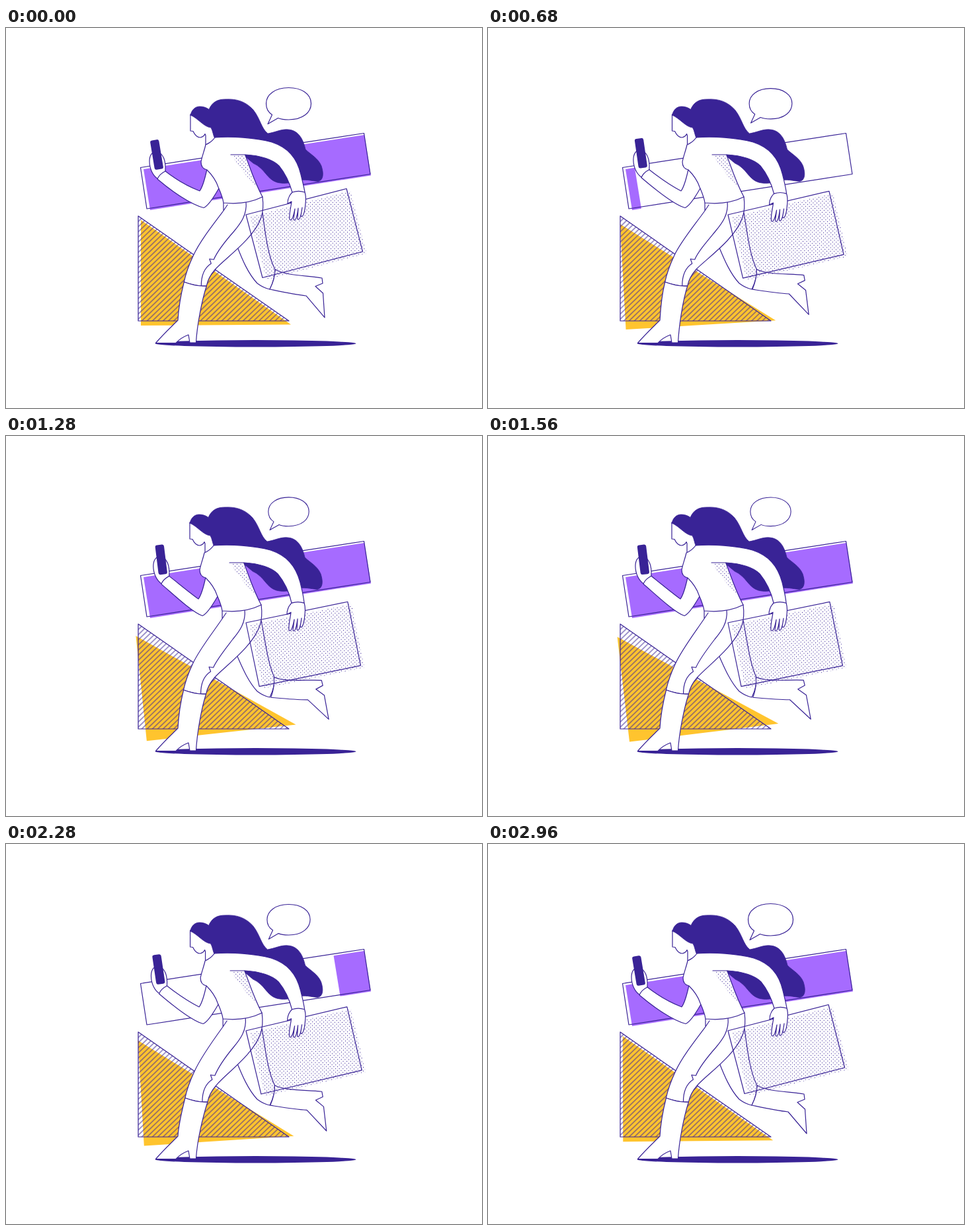
An HTML page that plays this animation: 720 px wide and 576 px high, repeating every 3000 ms.

```html
<!DOCTYPE html>
<html lang="en">
<head>
<meta charset="utf-8">
<title>Runner with phone</title>
<style>
  html, body { margin: 0; width: 100%; height: 100%; overflow: hidden; background: #fff; }
  svg { display: block; width: 720px; height: 576px; }
</style>
</head>
<body>
<svg viewBox="0 0 720 576" fill="#fff" stroke="#392396" stroke-width="1.2" stroke-linejoin="round" stroke-linecap="round">
  <defs>
    <pattern id="dots" width="5.6" height="5.6" patternUnits="userSpaceOnUse">
      <g fill="#392396" stroke="none"><circle cx="1.4" cy="1.4" r=".65"/><circle cx="4.2" cy="4.2" r=".65"/></g>
    </pattern>
    <pattern id="hatch" width="5.6" height="5.6" patternUnits="userSpaceOnUse" patternTransform="rotate(-44)">
      <path d="M0 2.8H5.6" stroke-width="1"/>
    </pattern>
  </defs>

  <polygon id="band" fill="#a66bff" stroke="none"/>
  <path d="M203.5 211.5L541.5 159.5L551 221.5L213 274Z" fill="none"/>

  <path id="wedge" d="M204 291V451L431 449.5Z" fill="#ffc42e" stroke="none"/>
  <path d="M200 285V444H428Z" fill="url(#hatch)"/>

  <ellipse cx="377.5" cy="478.3" rx="152" ry="5.2" fill="#392396" stroke="none"/>

  <path id="backThigh"/>
  <path id="shank" d="M407 366C425 376 455 375 478 379L479 387L468 391.5L479.5 402L482 439L454 406C436 404 418 400 399 396C403 388 407 378 407 366Z"/>
  <path id="frontLeg"/>
  <path id="fold" fill="none"/>
  <path id="boot"/>

  <g id="head">
    <path d="M279 131V156L283 156.500C286 163 290 166 294 166C298 165 300 163 301 160.500L302 163V177L318 168L312 140Z"/>
    <path fill="#392396" stroke-width=".8" d="M279 132C281 124 286 119 293 119C299 119 304 121 307 123.500C312 112 320 108 332 108C350 107 363 112 374 124C385 138 386 152 396 160C408 158 416 153 427 154C441 155 449 166 453 184C461 192 472 197 477 209C481 221 480 231 472 232.500C462 232 452 228 440 232C428 236 418 236 410 234C394 229 392 213 374 205L350 185L316 168C313 162 313 156 310 151C299 150 291 137 279 132Z"/>
  </g>

  <g id="hand">
    <path d="M230 229C222 224 217 213 217 202C217 193 221 187 228 187C237 190 242 200 241 217Z"/>
    <rect id="phone" x="221.300" y="169.500" width="13.400" height="45" rx="3" fill="#392396" stroke="none"/>
  </g>
  <path id="frontArm"/>
  <path id="torso"/>
  <path id="shade" d="M340 193L362 193C365 207 371 224 379 240C366 228 353 211 342 194Z" fill="url(#dots)" stroke="none"/>
  <path id="backArm"/>

  <g id="bag">
    <path d="M369 286L521 246.500L545.500 342L394 381.500Z" fill="url(#dots)" stroke="none"/>
    <path d="M363 283L515 243.500L539.500 339L388 378.500Z" fill="none"/>
  </g>
  <path id="backHand" d="M433 249C429 253 426 259 426 266L432 263C431 272 428 282 429 290C431 293 434 290 437 274L435 290C437 294 440 289 442 273L441 289C443 293 446 288 448 272L446 285C449 288 452 280 453 266C454 258 453 252 452 249C446 247 439 247 433 249Z"/>

  <path id="bubble" d="M402.500 131.500L396 145.500L411.500 136.500C416 138.500 422 139 427.500 139C449 139 461.500 128 461.500 114.500C461.500 100 447 90.500 427.500 90.500C407 90.500 393.500 101 393.500 114.500C393.500 122 397 128 402.500 131.500Z"/>
  <g id="sparks" fill="none"></g>
</svg>
<script>
const $ = id => document.getElementById(id);
const draw = (id, d) => $(id).setAttribute('d', d);
const move = (id, how) => $(id).setAttribute('transform', how);
const LOOP = 3000, PEAK = 1450;

// 0 to 1 between times a and b, eased at both ends
const ease = (t, a, b) => {
  const x = Math.min(1, Math.max(0, (t - a) / (b - a)));
  return x * x * (3 - 2 * x);
};

// centre, start times, opacity
const sparks = [
  [182.5, 220, [140, 885, 1900], .5],
  [522, 107.5, [1770], .5],
  [525, 422.5, [1765], .85]
].map(([x, y, starts, alpha]) => {
  const el = document.createElementNS('http://www.w3.org/2000/svg', 'path');
  $('sparks').append(el);
  return { el, x, y, starts, alpha };
});

function drawSpark({ el, x, y, starts, alpha }, t) {
  const start = starts.find(s => t > s && t < s + 340);
  let d = '';
  if (start !== undefined) {
    const u = (t - start) / 340, outer = 5 + 13 * u, inner = outer * (.25 + .65 * u);
    for (let i = 0; i < 6; i++) {
      const a = (i + .5) * Math.PI / 3, c = Math.cos(a), s = Math.sin(a);
      d += `M${x + inner * c} ${y + inner * s}L${x + outer * c} ${y + outer * s}`;
    }
    el.setAttribute('opacity', alpha * Math.min(1, (1 - u) * 2));
  }
  el.setAttribute('d', d);
}

function drawBand(t) {
  const second = t > 1500;
  const shown = second ? ease(t, 2395, 2855) : ease(t, 625, 1080);
  const gone = second ? ease(t, 1925, 2390) : ease(t, 130, 600);
  const [from, to] = shown > 0 ? [0, shown] : [gone, 1];
  const top = u => [208 + 334 * u, 214 - 52 * u];
  const low = u => [218 + 334 * u, 276 - 52.5 * u];
  $('band').setAttribute('points', [top(from), top(to), low(to), low(from)].join(' '));
}

function drawBody(p, k) {
  const s = -2 * p, x = n => n + s, kx = n => n + k;
  const hx = 6 * p, hy = -4.8 * p, wx = -p, wy = 4.3 * p;

  draw('backThigh', `M${350 + s / 2} 332C357 350 366 372 380 387C388 393 394 395 399 396
    C403 388 407 378 ${407 - p} 366C396 345 392 310 ${x(388)} 280L${x(365)} 290Z`);
  draw('frontLeg', `M${x(329)} 265V277L${x(335)} 268L${x(329)} 277
    C310 302 ${kx(292)} 325 ${kx(283)} 345C${kx(276)} 360 ${kx(271)} 375 ${kx(269)} 385
    C${kx(280)} 389 ${kx(292)} 392 ${kx(303)} 391C${kx(305)} 380 ${kx(310)} 373 ${kx(316)} 366
    C330 350 ${x(375)} 320 ${x(386)} 287C${x(390)} 275 ${x(389)} 264 ${x(388)} 256Z`);
  draw('fold', `M${x(363)} 263C${x(365)} 283 ${x(355)} 296 ${x(345)} 308
    C330 325 ${kx(319)} 339 ${kx(314)} 351L${kx(307.5)} 350L${kx(310)} 357
    C${kx(299)} 364 ${kx(295)} 375 ${kx(295)} 391`);
  draw('boot', `M${kx(269)} 385C${kx(280)} 389 ${kx(292)} 392 ${kx(303)} 391
    C${kx(296)} 413 289 450 287.500 477H278L276 465C268 468 262 472 257 477.500H226.500
    C238 464 250 453 260 443C261 425 ${kx(264)} 405 ${kx(269)} 385Z`);

  // the upper end is left open beneath the torso
  draw('frontArm', `M${x(304)} 214C${x(301)} 228 ${x(298)} 240 ${x(293)} 247
    C${275 + hx / 2} ${240 + hy / 2} ${255 + hx} ${228 + hy} ${241 + hx} ${217 + hy}
    C${235 + hx} ${220 + hy} ${231 + hx} ${224 + hy} ${229 + hx} ${229 + hy}
    C${250 + hx} ${247 + hy} ${280 + hx / 2} 268 ${x(299)} 272.500
    C${x(306)} 270 ${x(314)} 257 ${x(322)} 243L${x(330)} 225`);
  draw('torso', `M${x(302)} 177C${x(300)} 186 ${x(296)} 196 ${x(295)} 203
    C${x(295)} 210 ${x(299)} 214 ${x(304)} 215C${x(313)} 224 ${x(318)} 232 ${x(321)} 241
    C${x(325)} 250 ${x(328)} 258 ${x(329)} 265C${x(348)} 267 ${x(370)} 265 ${x(388)} 256
    C${x(376)} 234 ${x(370)} 214 ${x(362)} 193L${x(345)} 166L${x(316)} 166Q${x(310)} 174 ${x(302)} 177Z`);
  // the shoulder is left open so that the sleeve runs into the torso
  draw('backArm', `M${x(316)} 166C${x(340)} 164 ${x(378)} 166 ${x(402)} 173
    C${x(426)} 181 ${x(440)} 196 ${446 + wx} 222C${449 + wx} 235 ${451 + wx} 242 ${452 + wx} ${249 + wy}
    H${433 + wx}C${429 + wx} 235 ${x(422)} 220 ${x(413)} 209C${x(405)} 200 ${x(385)} 193 ${x(362)} 192H${x(340)}`);

  move('head', `translate(${-p} 0)`);
  move('shade', `translate(${s} 0)`);
  move('hand', `translate(${hx} ${hy})`);
  move('phone', `translate(${p} 0) rotate(${-9.4 + 2.4 * p} 228 192)`);
  move('backHand', `translate(${wx} ${wy})`);
  move('shank', `rotate(${-6.8 * p} 402 381)`);
}

function frame() {
  const t = performance.now() % LOOP, turn = 2 * Math.PI / LOOP;
  const p = (1 + Math.cos((t - PEAK) * turn)) / 2;
  const tilt = 1 - Math.abs(2 * t / LOOP - 1);
  drawBody(p, .3 - 1.6 * Math.sin(t * turn));
  drawBand(t);
  move('wedge', `rotate(${-6.9 * tilt} 317.5 370.5)`);
  move('bag', `rotate(${3 * p} 363 283)`);
  move('bubble', `translate(427.5 115) scale(${1 - .1 * p}) translate(-427.5 -115)`);
  sparks.forEach(s => drawSpark(s, t));
  requestAnimationFrame(frame);
}
frame();
</script>
</body>
</html>
```
